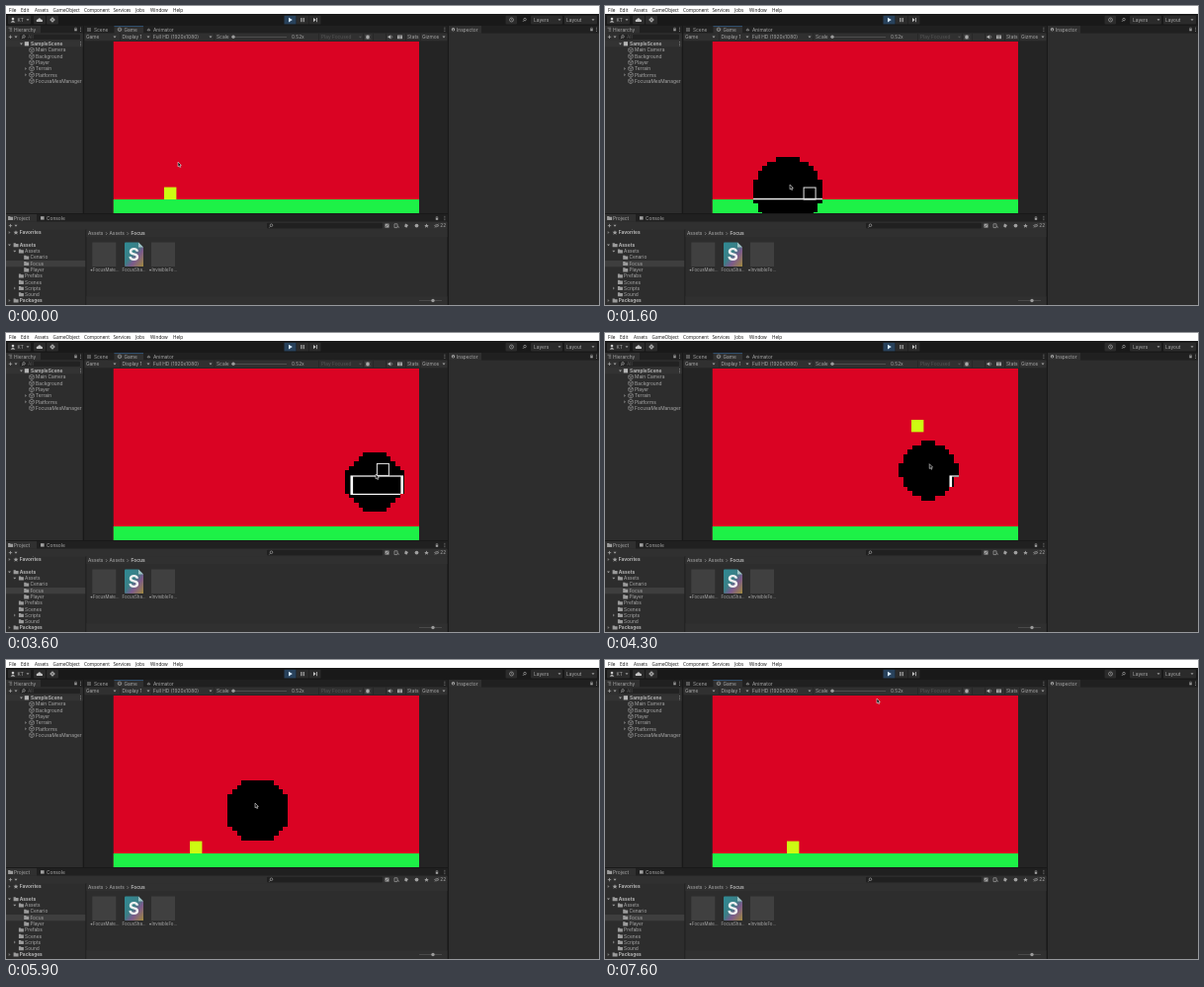
An HTML page with a canvas that plays this animation: 600 px wide and 303 px high, repeating every 7700 ms.

```html
<!DOCTYPE html>
<html lang="en">
<head>
<meta charset="utf-8">
<title>Focus lens</title>
<style>
  html, body { margin: 0; width: 100%; height: 100%; overflow: hidden; background: #191919; }
  svg, canvas { position: absolute; left: 0; top: 0; width: 600px; height: 303px; display: block; }
  text { font: 4.85px Inter, Roboto, sans-serif; fill: #a8a8a8; white-space: pre; }
  .menu { font: 4.7px "Open Sans", "Noto Sans", sans-serif; fill: #111; }
  .bold { font-weight: 700; fill: #b4b4b4; }
  .dim { fill: #565656; }
  .small { font-size: 4.4px; }
</style>
</head>
<body>
<svg id="ui" viewBox="0 0 600 303">
  <defs>
    <linearGradient id="page" x1="0" y1="0" x2="1" y2="1">
      <stop offset="0" stop-color="#2f8a94"/>
      <stop offset=".45" stop-color="#3b7f86"/>
      <stop offset=".65" stop-color="#7c5a8c"/>
      <stop offset="1" stop-color="#a08a3c"/>
    </linearGradient>
  </defs>
</svg>
<canvas id="game" width="600" height="303"></canvas>
<script>
// ---- Static editor interface ----
const parts = [];
const rect = (x, y, w, h, fill, extra = '') =>
  parts.push(`<rect x="${x}" y="${y}" width="${w}" height="${h}" fill="${fill}" ${extra}/>`);
const text = (x, y, str, cls = '') =>
  parts.push(`<text x="${x}" y="${y + 1.75}" class="${cls}">${str}</text>`);
const path = (d, fill = 'none', stroke = 'none', w = 0.7) =>
  parts.push(`<path d="${d}" fill="${fill}" stroke="${stroke}" stroke-width="${w}"/>`);
const dot = (x, y, r, fill, stroke = 'none') =>
  parts.push(`<circle cx="${x}" cy="${y}" r="${r}" fill="${fill}" stroke="${stroke}" stroke-width=".7"/>`);

const INK = '#a0a0a0';
const down = (x, y) => path(`M${x - 1.5} ${y - .8}h3l-1.5 1.9z`, INK);
const right = (x, y) => path(`M${x - .8} ${y - 1.5}v3l1.9 -1.5z`, '#777');
const cube = (x, y) =>
  path(`M${x} ${y - 2.6}l2.3 1.3v2.6l-2.3 1.3l-2.3 -1.3v-2.6zm-2.3 1.3l2.3 1.3l2.3 -1.3m-2.3 1.3v2.6`, 'none', '#999', .6);
const folder = (x, y) => path(`M${x - 2.4} ${y - 2}h2l.6 .7h2.4v3.4h-5z`, '#9b9b9b');
const plus = (x, y) => path(`M${x - 1.7} ${y}h3.4m-1.7 -1.7v3.4`, 'none', INK, .8);
const lens = (x, y) => { dot(x, y - .4, 1.3, 'none', INK); path(`M${x - .9} ${y + .6}l-1.2 1.3`, 'none', INK); };
const kebab = (x, y) => [-1.7, 0, 1.7].forEach(d => rect(x, y + d - .4, .8, .8, INK));
const lock = (x, y) => { rect(x - 1.2, y - .2, 2.4, 2, INK); path(`M${x - .8} ${y}v-1.4h1.6v1.4`, 'none', INK, .5); };

function menuAndToolbar() {
  rect(0, 0, 600, 8, '#fff');
  [[3, 'File'], [15, 'Edit'], [29, 'Assets'], [47.5, 'GameObject'], [79, 'Component'],
   [108.5, 'Services'], [131, 'Jobs'], [146, 'Window'], [169, 'Help']]
    .forEach(([x, s]) => text(x, 4, s, 'menu'));
  rect(0, 8, 600, 12, '#191919');
  rect(2, 9.8, 23, 8.6, '#2b2b2b', 'rx="1"');
  rect(28, 9.8, 12, 8.6, '#2b2b2b', 'rx="1"');
  rect(41, 9.8, 12, 8.6, '#2b2b2b', 'rx="1"');
  dot(7, 13.1, 1.3, '#ccc');
  path('M4.6 16.6q2.4 -3.4 4.8 0z', '#ccc');
  text(11.5, 14, 'KT'); down(22, 14);
  path('M31 16q-1 -2.4 1.2 -2.5q1.7 -2.5 3.2 0q2.2 .2 1.4 2.5z', '#c4c4c4');
  dot(47, 14, 1.7, 'none', '#c4c4c4');
  path('M47 11.2v5.6m-2.8 -2.8h5.6', 'none', '#c4c4c4', .6);
  rect(281.5, 9.8, 12, 8.6, '#28425c');
  rect(294, 9.8, 12, 8.6, '#2b2b2b');
  rect(306.5, 9.8, 12, 8.6, '#2b2b2b');
  path('M286 11.7v4.8l3.8 -2.4z', '#d8ecff');
  path('M298.9 12v4.2m2.3 -4.2v4.2', 'none', '#c4c4c4', 1);
  path('M311 12v4.2l2.6 -2.1z', '#c4c4c4');
  rect(314, 12, .8, 4.2, '#c4c4c4');
  rect(505.5, 9.8, 11.5, 8.6, '#2b2b2b', 'rx="1"');
  dot(511.5, 14, 2, 'none', INK);
  path('M511.5 12.8v1.4h1', 'none', INK, .5);
  lens(525, 14);
  rect(531, 9.8, 32, 8.6, '#2b2b2b', 'rx="1"');
  rect(565, 9.8, 33, 8.6, '#2b2b2b', 'rx="1"');
  text(534, 14, 'Layers'); down(560, 14);
  text(567, 14, 'Layout'); down(594, 14);
}

function panel(x, y, w, h) {
  rect(x, y, w, h, '#2d2d2d');
  rect(x, y, w, 7.6, '#202020');
}

function hierarchy() {
  panel(0, 20, 77.7, 190);
  rect(0, 20, 35, 7.6, '#303030');
  rect(0, 27.6, 77.7, 7.4, '#303030');
  path('M2.5 22.2h3.6m-2.4 1.5h2.4m-2.4 1.5h2.4', 'none', INK, .6);
  text(8, 23.8, 'Hierarchy');
  lock(70.5, 23.5); kebab(75, 23.8);
  plus(4.5, 31.3); down(10, 31.3);
  rect(14, 28.7, 61, 5.2, '#222', 'rx="1"');
  lens(18, 31.3); text(22, 31.3, 'All', 'dim');
  rect(0, 35.2, 77.7, 6.3, '#333');
  down(15.5, 38.3);
  rect(18.8, 36.2, 4.2, 4.2, '#b5b5b5');
  text(25, 38.3, 'SampleScene', 'bold');
  kebab(75, 38.3);
  ['Main Camera', 'Background', 'Player', 'Terrain', 'Platforms', 'FocusaMesManager'].forEach((s, i) => {
    const y = 44.7 + i * 6.27;
    cube(26, y); text(30, y, s);
    if (i === 3 || i === 4) right(20, y);
  });
}

function gamePanel() {
  panel(79.5, 20, 367, 190);
  rect(109.5, 20, 29.5, 7.6, '#303030');
  rect(109.5, 20, 29.5, .7, '#315e8a');
  rect(79.5, 27.6, 367, 7.8, '#303030');
  rect(79.5, 35.4, 367, 174.6, '#242424');
  path('M83 22v4m2 -4v4m-3 -3h4m-4 2h4', 'none', INK, .5);
  text(89, 23.8, 'Scene');
  dot(115, 23.8, 1.8, 'none', INK); path('M113 24h4', 'none', INK, .6);
  text(119.5, 23.8, 'Game');
  path('M143 24.8l1.4 -2l1.4 2z', 'none', INK, .7);
  text(149, 23.8, 'Animator');
  kebab(443.5, 23.8);
  [[81, 'Game'], [117.5, 'Display 1'], [149, 'Full HD (1920x1080)'], [213, 'Scale'],
   [289, '0.52x'], [406, 'Stats'], [421, 'Gizmos']].forEach(([x, s]) => text(x, 31.3, s));
  text(319, 31.3, 'Play Focused', 'dim');
  [110, 144, 207, 443].forEach(x => down(x, 31.3));
  [115, 147, 210.5, 316, 361, 371, 384, 404, 419].forEach(x => rect(x, 27.8, .6, 7.2, '#222'));
  rect(230, 31, 54, .8, '#555');
  dot(230, 31.3, 1.7, '#9a9a9a');
  path('M357 30.8h3l-1.5 1.8z', '#565656');
  dot(366, 31.5, 1.8, '#aaa'); path('M363.5 30h5m-5 3h5m-2.5 -4v5', 'none', '#aaa', .5);
  path('M386.5 30.6h1.2l1.6 -1.4v4.4l-1.6 -1.4h-1.2z', '#b8b8b8');
  path('M390.3 30.2q1 1.2 0 2.4', 'none', '#b8b8b8', .5);
  rect(396, 29.6, 5, 3.6, '#b0b0b0'); path('M396.7 30.8h3.6m-3 1.3h2.4', 'none', '#333', .5);
}

function inspector() {
  panel(448, 20, 152, 283);
  rect(448, 20, 33, 7.6, '#303030');
  dot(452.5, 23.8, 1.7, INK); rect(452.2, 23.3, .7, 1.7, '#222');
  text(456, 23.8, 'Inspector');
  lock(592.5, 23.5); kebab(597, 23.8);
}

function project() {
  panel(0, 211, 446.5, 92);
  rect(0, 211, 31, 7.8, '#303030');
  folder(4.5, 215); text(8, 215, 'Project');
  rect(35, 213.2, 3.6, 3.4, INK); text(41, 215, 'Console');
  lock(436, 215); kebab(443.5, 215);
  rect(0, 218.8, 446.5, 7.8, '#303030');
  plus(4.5, 222.6); down(10, 222.6);
  rect(264, 219.8, 117, 5.6, '#202020', 'rx="1"');
  lens(268.5, 222.6);
  rect(383.5, 220.6, 4, 4, INK); path('M384.3 223.8l2.4 -2.4', 'none', '#303030', .6);
  path('M393 220.8h3v3.8h-3zm3 2l2 1.8', 'none', INK, .7);
  path('M404 220.5l3 1.6l-1.6 2.6l-2.2 -1.2z', INK);
  dot(415.5, 222.6, 1.9, INK);
  path('M425.5 220.4l.7 1.5h1.6l-1.2 1.1l.4 1.7l-1.5 -.9l-1.5 .9l.4 -1.7l-1.2 -1.1h1.6z', INK);
  path('M433.5 222.6q2.3 -2.6 4.6 0q-2.3 2.6 -4.6 0zm.4 2l3.8 -4', 'none', INK, .6);
  text(439.2, 222.6, '22');

  rect(0, 258, 80.5, 6.3, '#3e3e3e');
  const tree = [
    ['Favorites', 0, 229.6, 'r'], ['Assets', 0, 242.2, 'd'], ['Assets', 1, 248.5, 'd'],
    ['Cenario', 2, 254.7, ''], ['Focus', 2, 261, ''], ['Player', 2, 267.3, ''],
    ['Prefabs', 1, 273.5, ''], ['Scenes', 1, 279.8, ''], ['Scripts', 1, 286, 'r'],
    ['Sound', 1, 292.2, ''], ['Packages', 0, 298.5, 'r']];
  tree.forEach(([s, depth, y, arrow]) => {
    const x = 10 + depth * 5.3;
    if (s === 'Favorites') path(`M${x} ${y - 2.4}l.7 1.6h1.8l-1.4 1.1l.5 1.8l-1.6 -1l-1.6 1l.5 -1.8l-1.4 -1.1h1.8z`, INK);
    else folder(x, y);
    if (arrow === 'd') down(x - 6.5, y);
    if (arrow === 'r') right(x - 6.5, y);
    text(x + 3.8, y, s, depth ? '' : 'bold');
  });
  rect(80.5, 226.6, .9, 76.4, '#1c1c1c');
  rect(81.4, 226.6, 365.1, 7.6, '#303030');
  text(83, 230.6, 'Assets'); text(104.5, 230.6, 'Assets'); text(126.5, 230.6, 'Focus', 'bold');
  [101, 122.5].forEach(x => path(`M${x} 229.2l1.3 1.4l-1.3 1.4`, 'none', INK, .6));

  [87.3, 147].forEach(x => rect(x, 239.5, 24, 24.5, '#404040'));
  path('M121 239.5h13l5 5v19.5h-18q-1 0 -1 -1v-22.5q0 -1 1 -1z', 'url(#page)');
  path('M134 239.5l5 5h-5z', '#9fc3c4');
  parts.push('<text x="129.4" y="258.2" text-anchor="middle" style="font-size:17px;font-weight:700;fill:#f2f2f2">S</text>');
  dot(86.5, 267.6, .9, INK); text(88, 267.6, 'FocusMate…', 'small');
  text(117.5, 267.6, 'FocusSha…', 'small');
  dot(146, 267.6, .9, INK); text(147.5, 267.6, 'InvisibleFo…', 'small');

  rect(81.4, 294.3, 365.1, 8.7, '#303030');
  rect(418, 298.2, 23, .7, '#555');
  dot(432, 298.5, 1.7, '#9a9a9a');
}

menuAndToolbar(); hierarchy(); gamePanel(); inspector(); project();
document.getElementById('ui').insertAdjacentHTML('beforeend', parts.join(''));

// ---- Game view ----
const ctx = document.getElementById('game').getContext('2d');
const LOOP = 7700, STEP = 100;
const VIEW = { x: 108.5, y: 36, w: 309.5, h: 174 };
const GROUND = 196, SIZE = 12.4, CELL = 4.67;
const PLATFORM = { x: 348.5, y: 144.4, w: 53.5, h: 19.6 };

// Rows: time, then values
const pointer = [[0, 174, 158], [400, 200, 164], [900, 262, 172], [1600, 187, 181], [2100, 285, 172],
  [2700, 389, 150], [3600, 374, 143], [4100, 352, 136], [5000, 245, 121], [5900, 252, 145],
  [6800, 269, 167], [7100, 272, 120], [7600, 275, 39]];
// Offset from the pointer, then radius in cells
const lensKeys = [[400, 0, 7, 6.3], [1600, -2, 7, 7.38], [2700, 0, 7, 7.65], [3600, -1, 8, 6.36],
  [5000, -.5, 5.5, 6.2], [6300, 4, 8, 7.1], [6800, 10, 8, 7.65], [7100, 2, 8, 7]];
const walk = [[0, 160], [1150, 160], [1600, 200.7], [2700, 294], [3550, 375], [3600, 375],
  [5000, 245], [5640, 186], [6800, 186], [7100, 184]];

function at(keys, t) {
  const i = keys.findIndex(k => k[0] > t);
  if (i === 0) return keys[0].slice(1);
  if (i < 0) return keys[keys.length - 1].slice(1);
  const a = keys[i - 1], b = keys[i], u = (t - a[0]) / (b[0] - a[0]);
  return a.slice(1).map((v, n) => v + (b[n + 1] - v) * u);
}

const arc = (t, top, peak) => top + 66 * ((t - peak) / 600) ** 2;

function playerTop(t) {
  const floor = GROUND - SIZE, ledge = PLATFORM.y - SIZE;
  if (t < 2500 || t > 5450) return floor;
  if (t < 3380) return Math.min(floor, arc(t, 117, 3100));
  if (t < 4046) return ledge;
  return Math.min(floor, arc(t, 66, 4646));
}

// Rows of square cells approximating a disc
function discPath(cx, cy, r) {
  ctx.beginPath();
  const n = Math.floor(r);
  for (let j = -n; j <= n; j++) {
    const half = Math.floor(Math.sqrt(r * r - j * j)) + .5;
    const y0 = Math.round(cy + (j - .5) * CELL), y1 = Math.round(cy + (j + .5) * CELL);
    const x0 = Math.round(cx - half * CELL), x1 = Math.round(cx + half * CELL);
    ctx.rect(x0, y0, x1 - x0, y1 - y0);
  }
}

function drawPointer(x, y) {
  ctx.beginPath();
  [[0, 0], [0, 4.8], [1.1, 3.9], [1.9, 5.6], [2.7, 5.2], [2, 3.6], [3.4, 3.4]]
    .forEach(([dx, dy]) => ctx.lineTo(x + dx, y + dy));
  ctx.closePath();
  ctx.fillStyle = '#111';
  ctx.fill();
  ctx.strokeStyle = '#ddd';
  ctx.lineWidth = .6;
  ctx.stroke();
}

function fill(color, x, y, w, h) {
  ctx.fillStyle = color;
  ctx.fillRect(x, y, w, h);
}

function draw(t) {
  ctx.clearRect(0, 0, 600, 303);
  const [mx, my] = at(pointer, t);
  const [px] = at(walk, t), py = playerTop(t);
  const { x, y, w, h } = VIEW;

  ctx.save();
  ctx.beginPath();
  ctx.rect(x, y, w, h);
  ctx.clip();
  fill('#da0323', x, y, w, h);
  fill('#1df147', x, GROUND, w, 20);
  fill('#cdfb12', px, py, SIZE, SIZE);

  if (t >= 400 && t < 7200) {
    const [dx, dy, r] = at(lensKeys, t);
    discPath(mx + dx, my + dy, r);
    ctx.fillStyle = '#000';
    ctx.fill();
    ctx.clip();
    const p = PLATFORM;
    fill('#e8e8e8', x, GROUND - 1.2, w, 1.5);
    fill('#fff', p.x, p.y, p.w, p.h);
    fill('#000', p.x + 2.6, p.y + 1.2, p.w - 5.2, p.h - 2.4);
    ctx.strokeStyle = '#e8e8e8';
    ctx.lineWidth = 1;
    ctx.strokeRect(px + .4, py + .4, SIZE - .4, SIZE - .4);
  }
  ctx.restore();

  if (t >= 4900 && t < 5200) [108, 167].forEach(gx => drawPointer(gx, 243.5));
  drawPointer(mx, my);
}

const start = performance.now();
function tick() {
  const t = (performance.now() - start) % LOOP;
  draw(Math.floor(t / STEP) * STEP);
  requestAnimationFrame(tick);
}
tick();
</script>
</body>
</html>
```
